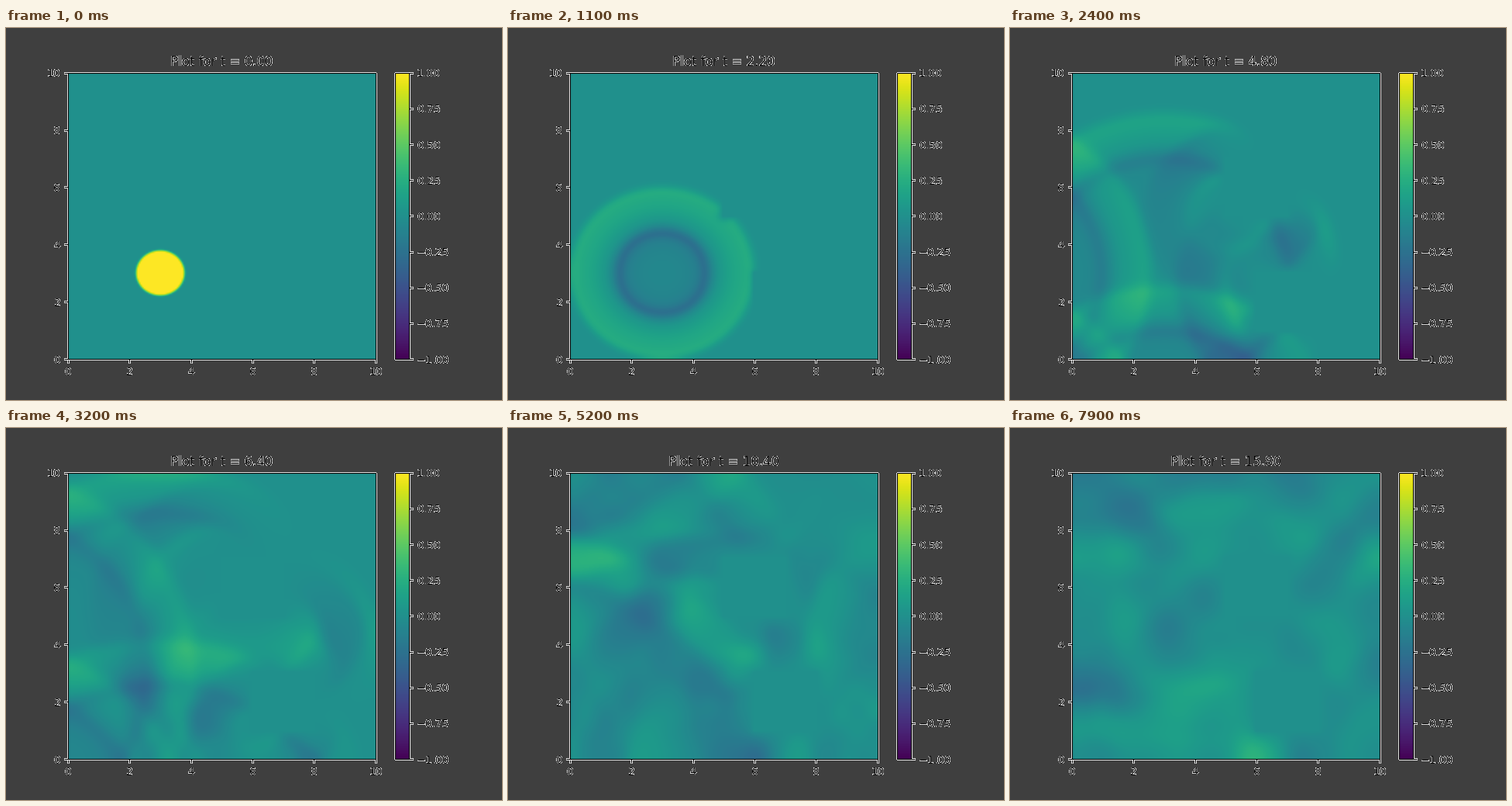
These frames come from a looping animation (640x480 px, 8 s). A matplotlib script:

```python
import numpy as np
import matplotlib.pyplot as plt
from matplotlib.animation import FuncAnimation

SIZE = 10.0          # side of the square domain
N = 200              # cells per side
FRAMES, FRAME_DT = 80, 0.2
SUBSTEPS = 10
DAMPING = 0.006
GREY = "#3f3f3f"


def laplacian(u, h):
    """Five-point stencil with reflecting outer walls."""
    p = np.pad(u, 1, mode="edge")
    return (p[:-2, 1:-1] + p[2:, 1:-1] + p[1:-1, :-2] + p[1:-1, 2:] - 4 * u) / h**2


def block(x, y, x0, y0, side=2.0, margin=0.05):
    def inside(v, low):
        return (v > low - margin) & (v < low + side + margin)
    return inside(x, x0) & inside(y, y0)


def simulate():
    """Damped wave equation around two fixed square blocks."""
    h, dt = SIZE / N, FRAME_DT / SUBSTEPS
    centers = (np.arange(N) + 0.5) * h
    x, y = np.meshgrid(centers, centers)
    free = ~(block(x, y, 5, 5) | block(x, y, 6, 1))

    u = np.clip((0.84 - np.hypot(x - 3, y - 3)) / 0.1, 0, 1)
    prev, lap_prev = u, laplacian(u, h)
    states = []
    for _ in range(FRAMES):
        states.append(u.astype(np.float32))
        for _ in range(SUBSTEPS):
            lap = laplacian(u, h)
            force = dt**2 * lap + DAMPING * dt * (lap - lap_prev)
            u, prev, lap_prev = (2 * u - prev + force) * free, u, lap
    return states


def on_white(img, dpi):
    """Flatten black ink on white, keeping untouched pixels transparent."""
    ink = img[..., 3]
    out = np.empty_like(img)
    out[..., :3] = (1 - ink)[..., None]
    out[..., 3] = ink > 0
    return out, 0, 0


def style(axes):
    axes.patch.set(facecolor="none", edgecolor="black", linewidth=0.8)
    for part in (axes.patch, axes.xaxis, axes.yaxis, axes.title):
        part.set_agg_filter(on_white)


states = simulate()

fig, ax = plt.subplots(figsize=(6.4, 4.8), dpi=100, facecolor=GREY)
image = ax.imshow(states[0], origin="lower", extent=(0, SIZE, 0, SIZE),
                  aspect="auto", cmap="viridis", vmin=-1, vmax=1,
                  interpolation="bilinear")
ax.set_xticks(range(0, 11, 2))
ax.set_yticks(range(0, 11, 2))
title = ax.set_title("Plot for t = 0.00")
bar = fig.colorbar(image, ax=ax)
style(ax)
style(bar.ax)


def update(i):
    image.set_data(states[i])
    title.set_text(f"Plot for t = {i * FRAME_DT:.2f}")
    return image, title


anim = FuncAnimation(fig, update, frames=FRAMES, interval=100,
                     repeat=True, repeat_delay=0, blit=False)
plt.show()
```
